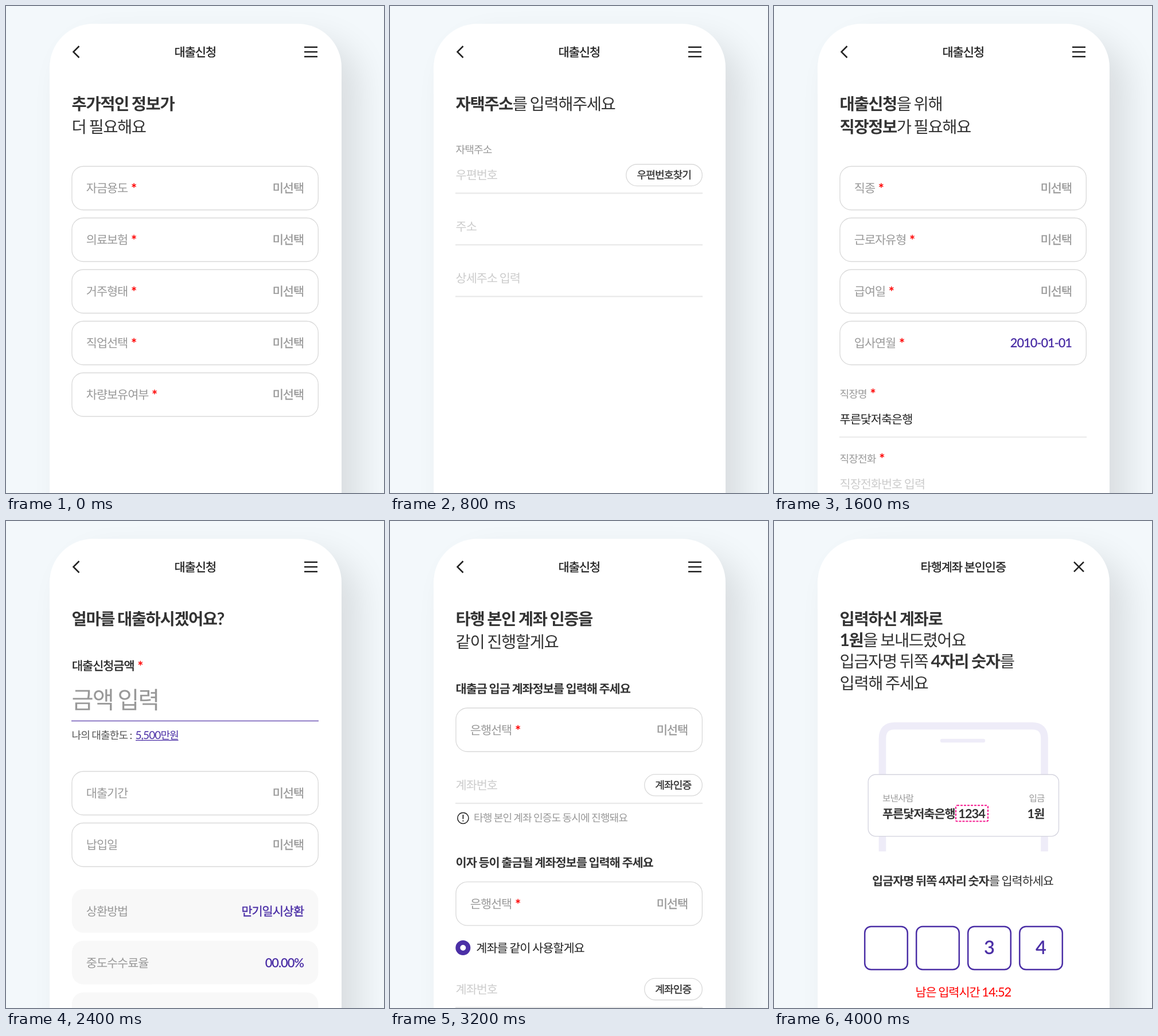
An HTML page for the animation above (4800 ms loop, 659 px wide and 849 px high).

```html
<!DOCTYPE html>
<html lang="ko">
<head>
<meta charset="utf-8">
<title>대출신청</title>
<style>
  html, body { margin: 0; width: 100%; height: 100%; overflow: hidden; }
  .stage { position: relative; width: 100%; height: 100%; overflow: hidden; contain: strict; background: #f3f8fb; }
  .phone {
    position: absolute; left: 75.5px; top: 31px; right: 74px; bottom: 0;
    border-radius: 76px 76px 0 0; background: #fff;
    box-shadow: 30px 30px 60px rgba(0, 0, 0, .11), 30px 130px 60px rgba(0, 0, 0, 0);
  }
  .phone { bottom: -120px; }
  svg { position: absolute; left: 0; top: 0; width: 659px; height: 849px; }
  .scene { visibility: hidden; animation: show 4.8s step-end infinite; }
  @keyframes show {
    0% { visibility: visible; }
    16.66667%, 100% { visibility: hidden; }
  }
  text {
    font: 400 20.8px "Noto Sans CJK KR", "Noto Sans CJK", sans-serif;
    letter-spacing: -.05em; word-spacing: -.053em;
    color: #333; fill: currentColor; text-rendering: geometricPrecision;
  }
  .head { font-size: 28.5px; }
  .small { font-size: 18.1px; }
  .tiny { font-size: 15.5px; }
  .big { font-size: 41.5px; }
  .mid { stroke: currentColor; stroke-width: .4px; }
  .bold { font-weight: 700; }
  .gray { color: #999; }
  .pale { color: #ccc; }
  .dark { color: #222; }
  .soft { color: #555; }
  .violet { color: #4b2fa6; }
  .red { color: #f00; }
  .end { text-anchor: end; }
  .center { text-anchor: middle; }
  .num { font-family: Lato, sans-serif; font-size: 1.05em; }
  .mid .num { font-weight: 600; stroke: none; }
  .star { font: 700 24px Lato, sans-serif; fill: #f00; stroke: none; }
  .box { fill: #fff; stroke: #d9d9d9; stroke-width: 1.3; }
  .flat { fill: #f8f8f8; }
  .rule { stroke: #e9e9e9; stroke-width: 2.2; }
  .icon { fill: none; stroke: #222; stroke-width: 2.5; }
</style>
</head>
<body>
<div class="stage">
  <div class="phone"></div>
  <svg viewBox="0 0 659 849"></svg>
</div>
<script>
  const LEFT = 114.6, RIGHT = 544.6, WIDTH = RIGHT - LEFT;

  // [..] is bold, * is the red "required" star, digits use the Latin face
  const rich = s => s
    .replace(/[\d,.:%?-]+/g, m => `<tspan class="num">${m}</tspan>`)
    .replace(/\[/g, '<tspan class="bold">').replace(/\]/g, '</tspan>')
    .replace('*', '<tspan class="star" dx="5.7" dy="2">*</tspan>');

  const text = (x, y, cls, s) => `<text x="${x}" y="${y}" class="${cls}">${rich(s)}</text>`;
  const rect = (x, y, w, h, r, attrs) =>
    `<rect x="${x}" y="${y}" width="${w}" height="${h}" rx="${r}" ${attrs}/>`;
  const rule = (y, attrs = 'class="rule"') => `<path d="M114 ${y}H545" ${attrs}/>`;

  const heading = (lines, pitch = 40) =>
    lines.map((s, i) => text(LEFT, 180.5 + i * pitch, 'head', s)).join('');

  const row = (y, label, value = '미선택', tone = 'gray', box = 'box') =>
    rect(LEFT + .3, y, WIDTH - .6, 76, 20, `class="${box}"`) +
    (label ? text(139.8, y + 45.8, 'gray', label) + text(519, y + 45.8, `${tone} mid end`, value) : '');

  const rows = (y, labels) => labels.map((s, i) => row(y + i * 90, s)).join('');

  const pill = (x, y, s) =>
    rect(x, y, 544.3 - x, 37.6, 18.8, 'class="box"') +
    text((x + 544.3) / 2 - .3, y + 25.2, 'small mid center', s);

  const field = (y, hint) => text(LEFT, y, 'pale', hint) + rule(y + 24.3);

  const bar = text(329.8, 87.5, 'mid dark center', '대출신청') +
    '<path class="icon" d="M127.5 70L117.5 80L127.5 90M520 71.7H543M520 80H543M520 88.2H543"/>';

  const extra = bar +
    heading(['[추가적인 정보가]', '더 필요해요']) +
    rows(279.5, ['자금용도*', '의료보험*', '거주형태*', '직업선택*', '차량보유여부*']);

  const home = bar +
    heading(['[자택주소]를 입력해주세요']) +
    text(LEFT, 257, 'small gray', '자택주소') +
    field(302, '우편번호') + pill(411.7, 276, '우편번호찾기') +
    field(392, '주소') + field(482, '상세주소 입력');

  const job = bar +
    heading(['[대출신청]을 위해', '[직장정보]가 필요해요']) +
    rows(279.5, ['직종*', '근로자유형*', '급여일*']) +
    row(549.5, '입사연월*', '2010-01-01', 'violet') +
    text(LEFT, 682.5, 'small gray', '직장명*') +
    text(LEFT, 727.5, 'dark', '푸른닻저축은행') + rule(751.5) +
    text(LEFT, 795.5, 'small gray', '직장전화*') +
    text(LEFT, 840.5, 'pale', '직장전화번호 입력');

  const amount = bar +
    heading(['[얼마를 대출하시겠어요?]']) +
    text(LEFT + .4, 260, 'mid dark', '대출신청금액*') +
    text(LEFT, 326.5, 'big gray', '금액 입력') +
    rule(348.5, 'stroke="#8d7bc6" stroke-width="2"') +
    text(LEFT, 379.5, 'small soft', '나의 대출한도 :') +
    text(225.5, 379.5, 'small violet', '5,500만원') +
    '<path d="M226 382.3H300.5" stroke="#4b2fa6" stroke-width="1.3"/>' +
    rows(436.5, ['대출기간', '납입일']) +
    row(641.8, '상환방법', '만기일시상환', 'violet', 'flat') +
    row(731.8, '중도수수료율', '00.00%', 'violet', 'flat') +
    row(821.8, '', '', '', 'flat');

  const account = bar +
    heading(['[타행 본인 계좌 인증을]', '같이 진행할게요']) +
    text(LEFT, 299.5, 'bold', '대출금 입금 계좌정보를 입력해 주세요') +
    row(326, '은행선택*') +
    field(467.8, '계좌번호') + pill(443.7, 441.6, '계좌인증') +
    '<circle cx="127.4" cy="518" r="9.6" fill="none" stroke="#222" stroke-width="1.5"/>' +
    '<path d="M127.4 512V519.5M127.4 521.8V523.8" stroke="#222" stroke-width="1.8"/>' +
    text(146, 524.3, 'small gray', '타행 본인 계좌 인증도 동시에 진행돼요') +
    text(LEFT, 602.5, 'bold', '이자 등이 출금될 계좌정보를 입력해 주세요') +
    row(629.2, '은행선택*') +
    '<circle cx="127.3" cy="744" r="9" fill="#fff" stroke="#4b2fa6" stroke-width="8"/>' +
    text(150.3, 751.8, 'dark', '계좌를 같이 사용할게요') +
    field(823.8, '계좌번호') + pill(443.7, 797.4, '계좌인증');

  const cell = (digit, i) =>
    rect(158.2 + i * 90, 707, 74.6, 75, 11, 'fill="#fff" stroke="#4b2fa6" stroke-width="2.5"') +
    `<text x="${374.7 + (i - 2) * 90}" y="755" class="violet mid center" style="font-size:31px">${rich(digit)}</text>`;

  const verify =
    text(329.8, 87.5, 'mid dark center', '타행계좌 본인인증') +
    '<path class="icon" d="M523 71.3L540 88.3M540 71.3L523 88.3"/>' +
    heading(['[입력하신 계좌로]', '[1원]을 보내드렸어요', '입금자명 뒤쪽 [4자리 숫자]를', '입력해 주세요'], 37.4) +
    '<path d="M189 576V379Q189 357.3 210.5 357.3H450Q471.5 357.3 471.5 379V576" fill="none" stroke="#eeecf8" stroke-width="12.6"/>' +
    '<path d="M293 383H365" stroke="#eeecf8" stroke-width="6.4" stroke-linecap="round"/>' +
    rect(164.2, 442, 332.3, 107.6, 13, 'fill="#fff" stroke="#d3d3de" stroke-width="1.3"') +
    text(189, 488.5, 'tiny gray', '보낸사람') + text(471.5, 488.5, 'tiny gray end', '입금') +
    text(189, 518.3, 'bold', '푸른닻저축은행') + text(321.3, 518.3, 'bold', '1234') +
    text(471.3, 518.3, 'bold end', '1원') +
    rect(317, 495.8, 56, 27.8, 2, 'fill="none" stroke="#f5198f" stroke-width="2" stroke-dasharray="4 2"') +
    text(329, 634.6, 'center', '[입금자명 뒤쪽 4자리 숫자]를 입력하세요') +
    ['', '', '3', '4'].map(cell).join('') +
    text(329.8, 829, 'red center', '남은 입력시간 14:52');

  document.querySelector('svg').innerHTML = [extra, home, job, amount, account, verify]
    .map((s, i) => `<g class="scene" style="animation-delay:${i * 800 - 4800}ms">${s}</g>`)
    .join('');
</script>
</body>
</html>
```
